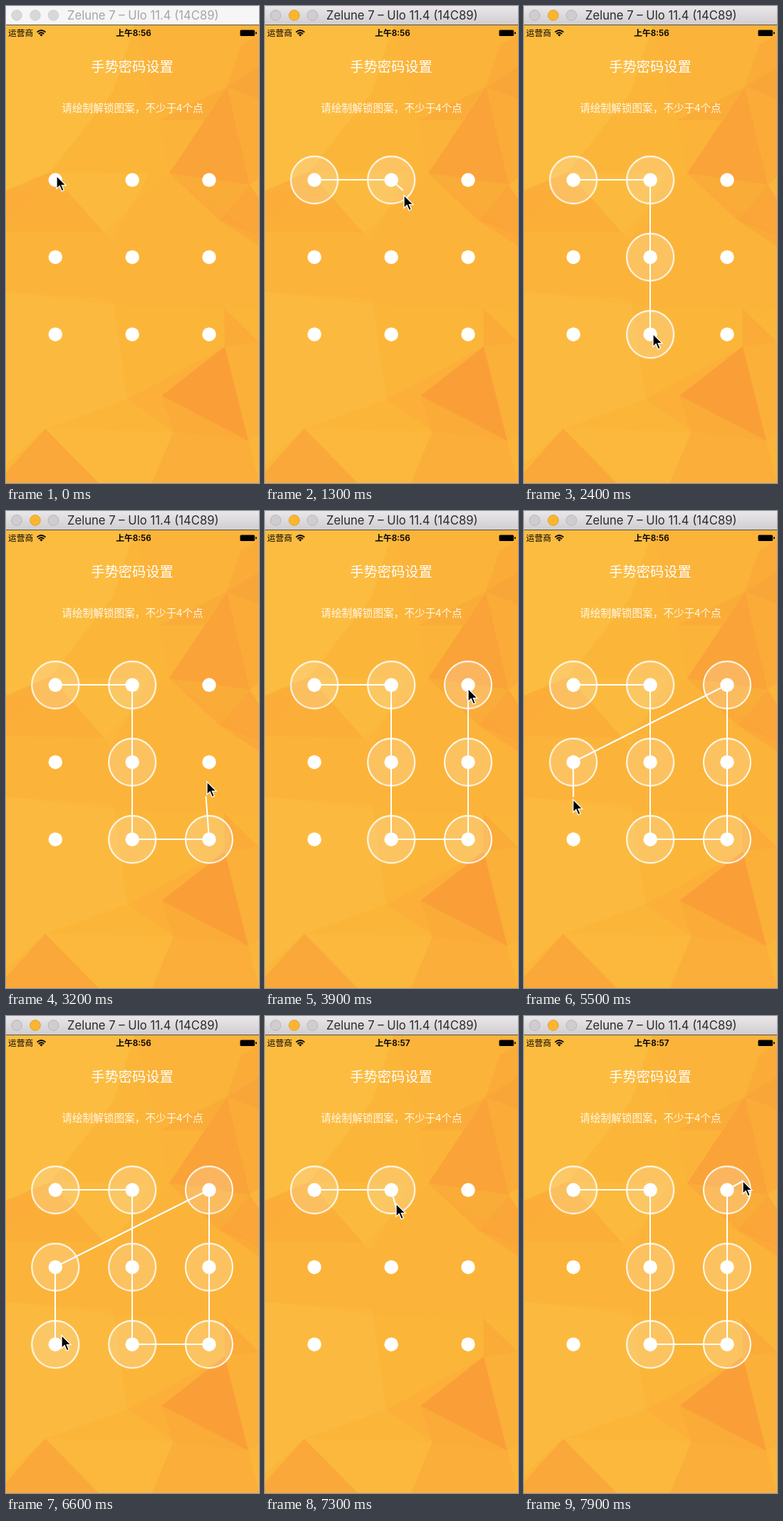
These frames come from a looping animation (355x667 px, 8000 ms). An HTML page without scripts:

```html
<!DOCTYPE html>
<html lang="zh">
<head>
<meta charset="utf-8">
<title>手势密码设置</title>
<style>
html, body { margin: 0; width: 100%; height: 100%; overflow: hidden; background: #fbb63a; }
svg { display: block; width: 355px; height: 667px; }
text { font-family: Inter, "Noto Sans CJK SC", "Noto Sans CJK", sans-serif; }
.cjk { font-family: "Noto Sans CJK SC", "Noto Sans CJK", sans-serif; }
.mid { text-anchor: middle; }

.ring, .seg, .on, .off, .late, .early, #pointer { animation: 8s step-end infinite; }
.ring { fill: #fff; fill-opacity: .2; stroke: #fff; stroke-width: 1.9; opacity: 0; }
.seg { fill: none; stroke: #fff; stroke-width: 2; }

.on { animation-name: on; }
.off { animation-name: off; }
.late { animation-name: late; }
.early { animation-name: early; }
@keyframes on { 0% { opacity: 0 } 3.75% { opacity: 1 } }
@keyframes off { 0% { opacity: 1 } 3.75%, 100% { opacity: 0 } }
@keyframes late { 0% { opacity: 0 } 87.5% { opacity: 1 } }
@keyframes early { 0% { opacity: 1 } 87.5%, 100% { opacity: 0 } }

/* rings: picked, cleared, picked again */
@keyframes r1 { 0%, 86.25% { opacity: 0 } 3.75%, 88.75%, 100% { opacity: 1 } }
@keyframes r2 { 0%, 86.25% { opacity: 0 } 12.5%, 91.25%, 100% { opacity: 1 } }
@keyframes r5 { 0%, 86.25% { opacity: 0 } 21.25%, 92.5%, 100% { opacity: 1 } }
@keyframes r8 { 0%, 86.25% { opacity: 0 } 27.5%, 93.75%, 100% { opacity: 1 } }
@keyframes r9 { 0%, 86.25% { opacity: 0 } 36.25%, 95%, 100% { opacity: 1 } }
@keyframes r6 { 0%, 86.25% { opacity: 0 } 41.25%, 96.25%, 100% { opacity: 1 } }
@keyframes r3 { 0%, 86.25% { opacity: 0 } 47.5%, 97.5%, 100% { opacity: 1 } }
@keyframes r4 { 0%, 86.25%, 100% { opacity: 0 } 58.75% { opacity: 1 } }
@keyframes r7 { 0%, 86.25%, 100% { opacity: 0 } 72.5% { opacity: 1 } }

/* each segment trails the pointer, then snaps to the next dot */
@keyframes s1 {
  0%, 86.25% { d: path("M69 243L69 243") }
  6.25% { d: path("M69 243L69 243"); animation-timing-function: steps(4) }
  11.25% { d: path("M69 243L140 241") }
  90% { d: path("M69 243L116 243") }
  12.5%, 91.25%, 100% { d: path("M69 243L177 243") }
}
@keyframes s2 {
  0%, 86.25% { d: path("M177 243L177 243") }
  12.5% { d: path("M177 243L158 241"); animation-timing-function: steps(2) }
  15% { d: path("M177 243L180 244") }
  16.25% { d: path("M177 243L194 258"); animation-timing-function: steps(3) }
  20% { d: path("M177 243L186 314") }
  91.25% { d: path("M177 243L184 268") }
  21.25%, 92.5%, 100% { d: path("M177 243L177 351") }
}
@keyframes s3 {
  0%, 86.25% { d: path("M177 351L177 351") }
  21.25% { d: path("M177 351L183 325"); animation-timing-function: steps(4) }
  26.25% { d: path("M177 351L181 414") }
  92.5% { d: path("M177 351L182 372") }
  27.5%, 93.75%, 100% { d: path("M177 351L177 459") }
}
@keyframes s4 {
  0%, 86.25% { d: path("M177 459L177 459") }
  27.5% { d: path("M177 459L181 432"); animation-timing-function: steps(2) }
  30% { d: path("M177 459L181 456"); animation-timing-function: steps(4) }
  35% { d: path("M177 459L240 460") }
  93.75% { d: path("M177 459L198 458") }
  36.25%, 95%, 100% { d: path("M177 459L285 459") }
}
@keyframes s5 {
  0%, 86.25% { d: path("M285 459L285 459") }
  36.25% { d: path("M285 459L268 459") }
  37.5% { d: path("M285 459L285 456"); animation-timing-function: steps(2) }
  40% { d: path("M285 459L280.500 399") }
  95% { d: path("M285 459L286 440") }
  41.25%, 96.25%, 100% { d: path("M285 459L285 351") }
}
@keyframes s6 {
  0%, 86.25% { d: path("M285 351L285 351") }
  41.25% { d: path("M285 351L282 378"); animation-timing-function: steps(4) }
  46.25% { d: path("M285 351L283 296") }
  96.25% { d: path("M285 351L287 345") }
  47.5%, 97.5%, 100% { d: path("M285 351L285 243") }
}
@keyframes s7 {
  0%, 86.25% { d: path("M285 243L285 243") }
  47.5% { d: path("M285 243L283 272"); animation-timing-function: steps(3) }
  51.25% { d: path("M285 243L285 243"); animation-timing-function: steps(5) }
  57.5% { d: path("M285 243L111 331") }
  58.75% { d: path("M285 243L69 351") }
  97.5% { d: path("M285 243L288 268") }
  98.75%, 100% { d: path("M285 243L307 231") }
}
@keyframes s8 {
  0%, 86.25%, 100% { d: path("M69 351L69 351") }
  58.75% { d: path("M69 351L98 336"); animation-timing-function: steps(2) }
  61.25% { d: path("M69 351L70 351"); animation-timing-function: steps(10) }
  71.25% { d: path("M69 351L69 421") }
  72.5% { d: path("M69 351L69 459") }
}

#pointer { animation-name: move; }
@keyframes move {
  0% { transform: translate(71px, 237px); animation-timing-function: steps(3) }
  3.75% { transform: translate(71px, 240px); animation-timing-function: steps(2) }
  6.25% { transform: translate(76px, 240px); animation-timing-function: steps(5) }
  12.5% { transform: translate(166px, 241px); animation-timing-function: steps(2) }
  15% { transform: translate(190px, 248px) }
  16.25% { transform: translate(195px, 264px); animation-timing-function: steps(3) }
  20% { transform: translate(184px, 322px); animation-timing-function: steps(6) }
  27.5% { transform: translate(181px, 440px); animation-timing-function: steps(2) }
  30% { transform: translate(181px, 458px); animation-timing-function: steps(2) }
  32.5% { transform: translate(205px, 461px); animation-timing-function: steps(3) }
  36.25% { transform: translate(284px, 458px) }
  37.5% { transform: translate(287px, 434px); animation-timing-function: steps(2) }
  40% { transform: translate(282px, 378px); animation-timing-function: steps(6) }
  47.5% { transform: translate(283px, 255px); animation-timing-function: steps(2) }
  50% { transform: translate(287px, 241px) }
  51.25% { transform: translate(270px, 248px); animation-timing-function: steps(5) }
  57.5% { transform: translate(104px, 332px); animation-timing-function: steps(3) }
  61.25% { transform: translate(66px, 352px); animation-timing-function: steps(3) }
  65% { transform: translate(68px, 375px); animation-timing-function: steps(7) }
  73.75% { transform: translate(70px, 440px); animation-timing-function: steps(4) }
  78.75% { transform: translate(74px, 456px); animation-timing-function: steps(3) }
  82.5% { transform: translate(78px, 446px); animation-timing-function: steps(2) }
  85% { transform: translate(78px, 430px); animation-timing-function: steps(3) }
  88.75% { transform: translate(69px, 243px); animation-timing-function: steps(2) }
  91.25% { transform: translate(184px, 262px) }
  92.5% { transform: translate(182px, 368px) }
  93.75% { transform: translate(200px, 458px) }
  95% { transform: translate(286px, 436px) }
  96.25% { transform: translate(287px, 340px) }
  97.5% { transform: translate(290px, 260px) }
  98.75%, 100% { transform: translate(307px, 230px) }
}
</style>
</head>
<body>
<svg viewBox="0 0 355 667">
  <defs>
    <linearGradient id="bar" x2="0" y2="1">
      <stop stop-color="#e9e7e9"/><stop offset="1" stop-color="#d0ced0"/>
    </linearGradient>
    <circle id="ring" r="33"/>
    <circle id="dot" r="9.7" fill="#fff"/>
    <g id="row"><use href="#dot" x="69.3"/><use href="#dot" x="177.2"/><use href="#dot" x="285"/></g>
  </defs>

  <!-- low-poly backdrop -->
  <path fill="#fbb63a" d="M0 0H355V667H0z"/>
  <g fill="#fcbc40">
    <path d="M0 27H180L150 120L62 232L0 258z"/>
    <path d="M62 232L200 235L148 329z" opacity=".6"/>
    <path d="M0 400L150 410L170 550L55 591L0 640z" opacity=".8"/>
    <path d="M55 591L235 595L205 667H130z" opacity=".5"/>
  </g>
  <g fill="#faa338">
    <path d="M180 27H355V85L310 113L215 160z" opacity=".2"/>
    <path d="M330 55L355 40V130L310 113z" opacity=".5"/>
    <path d="M310 113L355 85V240L342 250z" opacity=".55"/>
    <path d="M215 160L310 113L278 160z" opacity=".5"/>
    <path d="M215 160H278L229 234z" opacity=".15"/>
    <path d="M310 113L342 250L229 234z" opacity=".95"/>
    <path d="M229 234L342 250L300 300z" opacity=".5"/>
    <path d="M342 250L355 270V322L300 300z" opacity=".8"/>
    <path d="M300 300L355 322V336z" opacity=".5"/>
    <path d="M62 232L138 317L0 315V258z" opacity=".38"/>
    <path d="M0 258L48 258L0 302z" opacity=".25"/>
    <path d="M138 317L229 234L355 322V425L170 420L0 400V315z" opacity=".15"/>
    <path d="M306 422L355 470L307 476z" opacity=".6"/>
    <path d="M307 476L355 470V600L340 608z" opacity=".35"/>
    <path d="M170 550L307 476L218 545L235 595z" opacity=".3"/>
    <path d="M307 476L340 608L218 545z" fill="#fa9f37"/>
    <path d="M218 545L340 608L235 595z" opacity=".6"/>
    <path d="M235 595L340 608L355 667H205z" opacity=".4"/>
    <path d="M55 591L130 667H0V652z" opacity=".75"/>
  </g>

  <!-- title bar -->
  <g class="on">
    <path fill="url(#bar)" d="M0 0H355V26H0z"/>
    <g fill="#cfcdcf" stroke="#b7b5b7">
      <circle cx="15" cy="13" r="7.3"/>
      <circle cx="41" cy="13" r="7.3" fill="#fdb52f" stroke="#e0a02c"/>
      <circle cx="66.500" cy="13" r="7.3"/>
    </g>
  </g>
  <g class="off">
    <path fill="#f6f6f6" d="M0 0H355V26H0z"/>
    <g fill="#d9d8d9" stroke="#cccacc" stroke-width=".8">
      <circle cx="15" cy="13" r="7.3"/><circle cx="41" cy="13" r="7.3"/><circle cx="66.500" cy="13" r="7.3"/>
    </g>
  </g>
  <path fill="#56504a" d="M0 26H355V27H0z"/>
  <g font-size="16.65">
    <text class="on" x="86" y="19" fill="#2b2a2b">Zelune 7 – Ulo 11.4 (14C89)</text>
    <text class="off" x="86" y="19" fill="#a6a5a6">Zelune 7 – Ulo 11.4 (14C89)</text>
  </g>

  <!-- status bar -->
  <text class="cjk" x="3" y="42.300" font-size="11.7">运营商</text>
  <g fill="none" stroke="#000" stroke-width="1.7">
    <path d="M43.500 36.700Q49.500 31.300 55.500 36.700M45.700 39Q49.500 35.500 53.300 39"/>
    <path fill="#000" stroke="none" d="M47.300 40.200Q49.500 38.300 51.700 40.200L49.500 42.600z"/>
  </g>
  <g class="mid" font-size="11.8" font-weight="600">
    <text class="early" x="179" y="42.200">上午8:56</text>
    <text class="late" x="179" y="42.200">上午8:57</text>
  </g>
  <rect x="328.500" y="33.500" width="20.500" height="8.500" rx="1.5"/>
  <path d="M350 36Q352 36.300 352 37.800T350 39.600z"/>

  <g class="mid" fill="#fff">
    <text class="cjk" x="177" y="92.200" font-size="19.3" font-weight="300">手势密码设置</text>
    <text class="cjk" x="177.500" y="148.300" font-size="14.65" font-weight="300" fill="#fff8e8">请绘制解锁图案，不少于4个点</text>
  </g>

  <!-- pattern lock -->
  <use class="ring" href="#ring" x="69.3" y="243.3" style="animation-name:r1"/>
  <use class="ring" href="#ring" x="177.2" y="243.3" style="animation-name:r2"/>
  <use class="ring" href="#ring" x="285" y="243.3" style="animation-name:r3"/>
  <use class="ring" href="#ring" x="69.3" y="351.200" style="animation-name:r4"/>
  <use class="ring" href="#ring" x="177.2" y="351.200" style="animation-name:r5"/>
  <use class="ring" href="#ring" x="285" y="351.200" style="animation-name:r6"/>
  <use class="ring" href="#ring" x="69.3" y="459.200" style="animation-name:r7"/>
  <use class="ring" href="#ring" x="177.2" y="459.200" style="animation-name:r8"/>
  <use class="ring" href="#ring" x="285" y="459.200" style="animation-name:r9"/>

  <path class="seg" style="animation-name:s1"/>
  <path class="seg" style="animation-name:s2"/>
  <path class="seg" style="animation-name:s3"/>
  <path class="seg" style="animation-name:s4"/>
  <path class="seg" style="animation-name:s5"/>
  <path class="seg" style="animation-name:s6"/>
  <path class="seg" style="animation-name:s7"/>
  <path class="seg" style="animation-name:s8"/>

  <use href="#row" y="243.3"/>
  <use href="#row" y="351.200"/>
  <use href="#row" y="459.200"/>

  <g id="pointer">
    <path d="M0 .5V18.500L4.200 14.700L7.200 21.800L10.300 20.500L7.300 13.600H13z" stroke="#fff" stroke-width="1.3"/>
  </g>
</svg>
</body>
</html>
```
